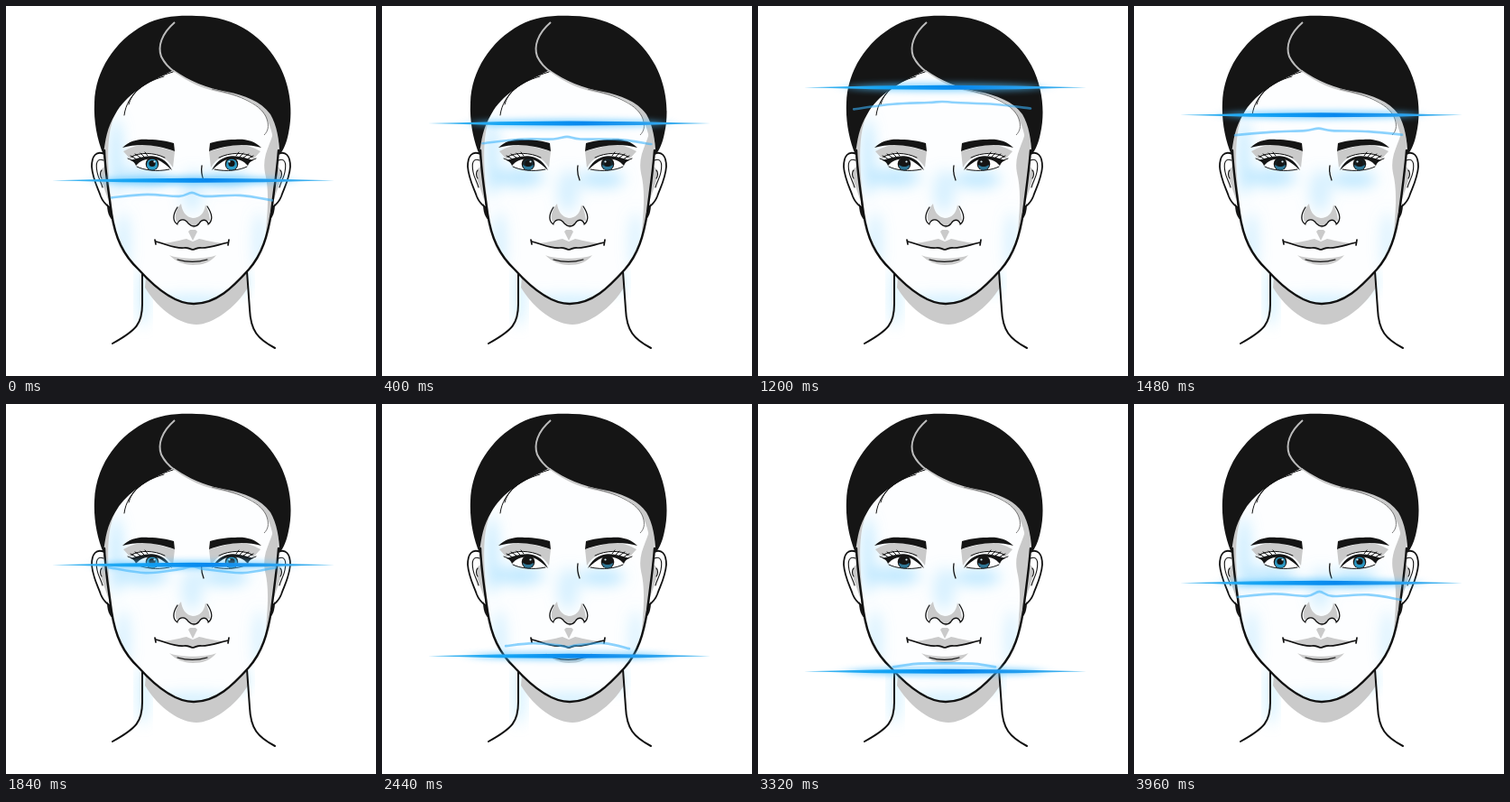
An HTML page that plays this animation: 410x410 px, repeating every 4 s.

```html
<!DOCTYPE html>
<html lang="en">
<head>
<meta charset="utf-8">
<title>Face scan</title>
<style>
  html, body { margin: 0; width: 100%; height: 100%; overflow: hidden; background: #fff; }
  svg { display: block; width: 100vw; height: 100vh; }
  .ink { fill: none; stroke: #111; stroke-linecap: round; stroke-linejoin: round; }
  .shade { fill: #cacaca; }
  .black { fill: #151515; }
</style>
</head>
<body>
<svg viewBox="0 0 410 410">
  <defs>
    <filter id="soft" x="-60%" y="-60%" width="220%" height="220%"><feGaussianBlur stdDeviation="8"/></filter>
    <filter id="beamBlur" filterUnits="userSpaceOnUse" x="30" y="-30" width="360" height="60"><feGaussianBlur stdDeviation="8 3"/></filter>
    <linearGradient id="beamFill" gradientUnits="userSpaceOnUse" x1="51" x2="364" y1="0" y2="0">
      <stop offset="0" stop-color="#48b9ef"/>
      <stop offset=".3" stop-color="#12a2f4"/>
      <stop offset=".55" stop-color="#0888ee"/>
      <stop offset="1" stop-color="#48b9ef"/>
    </linearGradient>
    <path id="face" d="M109 150C109 178 113 204 117 230C121 257 130 276 147 292C166 313 187 330 208 330C233 330 251 312 269 292C284 275 290 254 294 229C297 204 301 178 302 150C301 112 275 60 205 60C140 60 109 112 109 150Z"/>
    <clipPath id="inFace"><use href="#face"/></clipPath>

    <g id="eye">
      <path class="shade" d="M130 161C140 155 150 153 160 154L187 161L185 179C178 167 165 163 152 164C145 165 140 168 138 170Z"/>
      <path fill="#fff" d="M143 176C148 169 156 167 164 168C173 169 179 175 183 181C173 183 152 184 143 176Z"/>
      <circle cx="162" cy="175" r="7.3" class="black"/>
      <path d="M156 176A6 6 0 0 0 168 176Q162 180 156 176Z" fill="#2f7594"/>
      <circle class="irisLight" cx="162" cy="175.5" r="6" fill="#2c9fcb"/>
      <circle cx="162" cy="174.5" r="3.6" class="black"/>
      <circle cx="164.5" cy="172.5" r="1.1" fill="#dff3fc"/>
      <path class="black" d="M138 171C147 168 155 165.500 164 166.500C174 168 180 174 184 182C177 176 171 170 163 169.500C155 169 149 171 144 177C143 174 141 172 138 171Z"/>
      <path class="ink" stroke-width="1" d="M145 178C153 182 167 184 181 181M139 167C148 162 164 162 176 168M142 172L135 169M145 170L138 166M149 168L143 164M153 167L149 163M157 166L154 162"/>
      <path class="black" d="M129 157C137 149 148 147 158 148C169 148 179 150 186 152L187 161C176 157 163 154 151 154C143 154 136 155 129 157Z"/>
    </g>

    <g id="ear">
      <path d="M109 164C100 160 95 166 95 178C96 192 102 202 105 211C108 219 113 222 116 224Z" fill="#fff" stroke="#111" stroke-width="1.8"/>
      <path class="shade" d="M108 179C104 180 104 190 107 197L114 217L110 176Z"/>
      <path class="ink" stroke-width="1.100" d="M108 171C101 168 99 174 101 184C102 190 105 194 107 201M106 182C104 184 104 188 106 191"/>
      <path class="black" d="M112 219L116 225L120 239C114 235 112 228 112 219Z"/>
    </g>
  </defs>

  <rect width="410" height="410" fill="#fff"/>

  <!-- neck -->
  <ellipse cx="152" cy="322" rx="5" ry="34" fill="#8edcff" opacity=".5" filter="url(#soft)"/>
  <ellipse cx="262" cy="306" rx="6" ry="14" fill="#8edcff" opacity=".55" filter="url(#soft)"/>
  <path class="shade" d="M154 312C170 338 194 353 211 353C229 353 255 334 268 312L267 294L208 330L155 300Z"/>
  <path class="ink" stroke-width="2" d="M151 294V330C151 352 145 359 118 374M267 294L270 336C271 360 279 369 298 379"/>

  <use href="#ear"/>
  <use href="#ear" transform="matrix(-1 0 0 1 410 0)"/>

  <!-- face -->
  <use href="#face" fill="#fdfeff"/>
  <g clip-path="url(#inFace)">
    <g fill="#7fd2ff" filter="url(#soft)">
      <ellipse cx="152" cy="190" rx="28" ry="10" opacity=".5"/>
      <ellipse cx="243" cy="192" rx="26" ry="9" opacity=".5"/>
      <ellipse cx="206" cy="205" rx="12" ry="24" opacity=".3"/>
      <ellipse cx="122" cy="168" rx="6" ry="44" opacity=".5"/>
      <ellipse cx="130" cy="262" rx="7" ry="34" opacity=".35"/>
      <ellipse cx="281" cy="262" rx="7" ry="34" opacity=".3"/>
      <ellipse cx="208" cy="328" rx="52" ry="6" opacity=".45"/>
    </g>
    <path class="shade" d="M106 120L124 113C112 135 111 163 116 211L118 235L109 180Z"/>
    <path class="shade" d="M303 120L296 121C302 148 282 158 287 185C292 205 290 226 287 262L300 225Z"/>
    <path class="shade" d="M184 71C211 92 230 94 252 99C278 103 293 121 297 153L306 140L285 98L220 75Z"/>
  </g>
  <path class="ink" stroke-width="2.400" d="M109 160C110 185 114 207 117 230C121 257 130 276 147 292C166 313 187 330 208 330C233 330 251 312 269 292C284 275 290 254 294 229C297 204 300 185 302 160"/>

  <!-- hair -->
  <path class="black" d="M108 165C101 148 97 128 98 107C99 72 120 39 153 21C171 11 194 10 211 11C256 11 287 36 303 66C316 91 318 119 313 141C311 151 308 159 303 165C303 148 300 132 293 120C282 105 264 99 245 95C222 91 203 83 186 71C157 84 133 98 121 120C112 135 110 148 108 165Z"/>
  <path fill="none" stroke="#bcbcbc" stroke-width="2" d="M187 18C172 31 168 45 172 56C176 64 181 69 187 73"/>
  <path class="ink" stroke="#222" stroke-width="1" d="M185 73C155 82 134 97 131 121M175 78C151 85 139 97 136 109"/>
  <path fill="none" stroke="#777" stroke-width="1" d="M228 92C261 99 284 110 289 125C292 134 290 139 286 143"/>

  <use href="#eye"/>
  <use href="#eye" transform="matrix(-1 0 0 1 412 0)"/>

  <!-- nose -->
  <path class="shade" d="M194 219C189 225 186 232 189 239L196 237L208 246L218 237L226 238C226 231 223 225 221 220C220 230 214 235 207 235C199 234 195 227 194 219Z"/>
  <path class="ink" stroke-width="1.300" d="M190 223C184 232 185 239 190 242M223 222C229 231 229 238 224 242M190 241C193 235 199 236 202 241C206 245 211 245 214 241C217 236 222 236 224 241M217 177C216 183 217 188 219 193"/>
  <path class="shade" d="M202 250L207 260L212 250L210 248H204Z"/>

  <!-- mouth -->
  <path class="shade" d="M168 263C181 263 190 260 200 258L207 261L214 258C224 260 234 263 245 263C234 267 225 267 216 269L207 271L198 269C188 269 179 264 168 263Z"/>
  <path class="shade" d="M181 276C192 281 222 281 233 276C227 284 218 287 207 287C197 287 188 283 181 276Z"/>
  <path class="ink" stroke-width="1.700" d="M166 261C178 264 187 269 197 268C201 267 203 269 207 270C211 269 213 267 217 268C227 268 236 264 246 262M165 259L166 264M247 259L246 265"/>
  <path class="ink" stroke-width="1.200" d="M190 281C200 284 213 284 223 281"/>

  <!-- scanner -->
  <path id="contour" fill="none" stroke="#3cb4fc" stroke-opacity=".58" stroke-width="2.600" stroke-linecap="round"/>
  <g id="beam">
    <ellipse cx="207" cy="0" rx="112" ry="5" fill="#52c1ff" opacity=".6" filter="url(#beamBlur)"/>
    <path d="M51 0Q207 -5 364 0Q207 5 51 0Z" fill="url(#beamFill)"/>
  </g>
</svg>
<script>
const LOOP = 4000;
// time, beam y, contour left x, right x, then contour heights relative to the beam
const KEYS = [
  [0, 193.5, 117, 295, 19, 15.5, 17.5, 13.5, 17.5, 16.5, 22],
  [560, 107, 109, 300, 23, 18, 17, 15, 17, 18, 23],
  [840, 79.5, 104, 304, 24, 18, 16, 15.5, 16, 18.5, 23],
  [1080, 81, 104, 304, 24, 18, 16, 15.5, 16, 18.5, 23],
  [1480, 120.5, 112, 297, 22.5, 19, 17.5, 15, 17.5, 18.5, 22],
  [1840, 178, 114, 299, 3, 9, 5, 2, 5, 9, 3],
  [2440, 279, 137, 274, -11, -14, -12, -10, -12, -14, -8],
  [2800, 314, 169, 248, -5, -9, -9, -9, -9, -9, -5],
  [3080, 316, 170, 246, -5, -9, -9, -9, -9, -9, -5],
  [3320, 296.5, 150, 263, -5, -8.5, -9, -9, -9, -8.5, -5],
  [3960, 198.5, 115, 296, 15.5, 12, 14.5, 9.5, 14.5, 13, 18.5]
];
const SPREAD = [0, .22, .42, .5, .58, .8, 1];
const beam = document.getElementById("beam");
const contour = document.getElementById("contour");
const irises = document.querySelectorAll(".irisLight");

function keyAt(i) {
  const n = KEYS.length, turn = Math.floor(i / n);
  const [time, ...values] = KEYS[i - turn * n];
  return { time: time + turn * LOOP, values };
}

// Cubic Hermite interpolation around the loop
function sample(time) {
  let i = KEYS.length - 1;
  while (KEYS[i][0] > time) i--;
  const [a, b, c, d] = [-1, 0, 1, 2].map(k => keyAt(i + k));
  const span = c.time - b.time, u = (time - b.time) / span;
  return b.values.map((from, k) => {
    const to = c.values[k];
    const m0 = (to - a.values[k]) / (c.time - a.time) * span;
    const m1 = (d.values[k] - from) / (d.time - b.time) * span;
    return from + u * (m0 + u * (3 * (to - from) - 2 * m0 - m1 + u * (2 * (from - to) + m0 + m1)));
  });
}

function smoothPath(points) {
  const at = i => points[Math.max(0, Math.min(points.length - 1, i))];
  let d = "M" + points[0];
  for (let i = 0; i < points.length - 1; i++) {
    const [a, b, c, e] = [at(i - 1), at(i), at(i + 1), at(i + 2)];
    const c1 = b.map((v, k) => v + (c[k] - a[k]) / 6);
    const c2 = c.map((v, k) => v - (e[k] - b[k]) / 6);
    d += `C${c1} ${c2} ${c}`;
  }
  return d;
}

function draw(now) {
  const [y, left, right, ...heights] = sample(now % LOOP);
  beam.setAttribute("transform", `translate(0 ${y})`);
  contour.setAttribute("d", smoothPath(heights.map((h, i) => [left + (right - left) * SPREAD[i], y + h])));
  const light = Math.exp(-(((y - 185) / 40) ** 2));
  irises.forEach(iris => iris.setAttribute("opacity", light));
  requestAnimationFrame(draw);
}
draw(performance.now());
</script>
</body>
</html>
```
